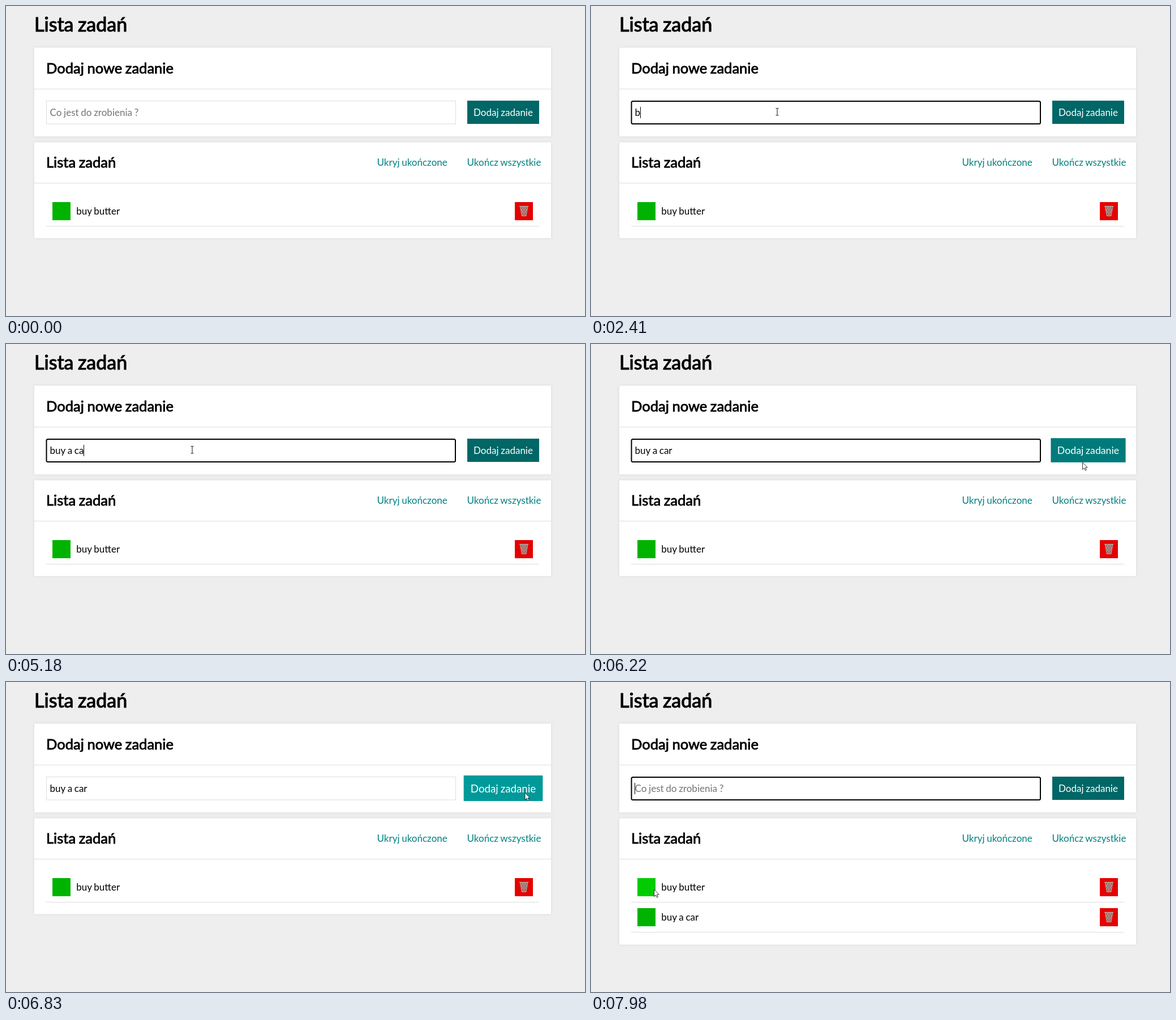
An HTML page for the animation above (8 s loop, 1023x547 px).

```html
<!DOCTYPE html>
<html lang="pl">
<head>
<meta charset="utf-8">
<title>Lista zadań</title>
<style>
html, body { margin: 0; width: 100%; height: 100%; overflow: hidden; background: #eee; }
svg { display: block; }
text { font: 17.03px Lato, sans-serif; word-spacing: -.04em; white-space: pre; }
.h { stroke: #000; stroke-width: .033em; }
.h1 { font-size: 34.06px; }
.h2 { font-size: 25.55px; }
.link { fill: teal; }
.panel { fill: #fff; filter: drop-shadow(0 0 2px #d8d8d8); }
.line { fill: none; stroke: #ddd; }
</style>
</head>
<body>
<svg width="1023" height="547" viewBox="0 0 1023 547">
  <defs>
    <g id="row">
      <path class="line" d="M71 388.5H942"/>
      <rect x="82" y="346" width="32" height="32"/>
      <rect x="899" y="346" width="32" height="32" fill="#e60000"/>
      <g fill="none" stroke="#b0aaa2">
        <path d="M908.5 354L911.3 370.5H919L921.8 354Z" fill="#a5605a"/>
        <path d="M909 357l9 13M912 355l7.5 11M916 355l4.5 6M921.4 357l-9 13M918.4 355l-7.5 11M914.4 355l-4.5 6" stroke-width=".9"/>
        <path d="M907 353.5H923.3" stroke-width="1.4"/>
      </g>
    </g>
  </defs>
  <text class="h h1" x="50" y="45">Lista zadań</text>

  <rect class="panel" x="50" y="73.5" width="913" height="156.5"/>
  <path class="line" d="M50 146.5H963"/>
  <text class="h h2" x="71" y="119">Dodaj nowe zadanie</text>
  <rect id="field" fill="#fff"/>
  <text id="entry" x="77.6" y="194"></text>
  <rect id="caret" y="178" width="1" height="20"/>
  <g id="button">
    <rect x="815" y="167" width="127" height="41"/>
    <text x="878.5" y="194" fill="#fff" text-anchor="middle">Dodaj zadanie</text>
  </g>

  <rect id="list" class="panel" x="50" y="240.5" width="913"/>
  <path class="line" d="M50 312.5H963"/>
  <text class="h h2" x="71" y="285">Lista zadań</text>
  <text class="link" x="655.5" y="282">Ukryj ukończone</text>
  <text class="link" x="814.5" y="282">Ukończ wszystkie</text>
  <use id="first" href="#row"/>
  <text x="124.3" y="368">buy butter</text>
  <g id="added" transform="translate(0 53)">
    <use href="#row" fill="#00b300"/>
    <text x="124.3" y="368">buy a car</text>
  </g>

  <g id="mouse">
    <path id="arrow" d="M.5 .5V13L3.4 10.3L5.3 14.7L7.3 13.8L5.4 9.6H9.2Z" fill="#fff" stroke="#222" stroke-width=".9"/>
    <path id="beam" d="M-2.5 -6.5H-.8L0 -6L.8 -6.5H2.5M0 -6V5.5M-2.5 6H-.8L0 5.5L.8 6H2.5" fill="none" stroke="#111"/>
  </g>
</svg>
<script>
const LOOP = 8000, FOCUS = 640, BLUR = 6650, ADD = 6850, BLINK = 518;
const phrase = 'buy a car';
// Two quick letters, a pause, then a steady rhythm.
const keyTimes = [...phrase].map((_, i) => i < 2 ? 2410 + 230 * i : 3910 + 254 * (i - 2));
const moves = [
  { at: 30, span: 700, x: 329, y: 187, sag: 0 },
  { at: 5890, span: 500, x: 916.5, y: 195, sag: 55 },
  { at: 6855, span: 265, x: 214.5, y: 403.5, sag: 0 },
  { at: 7120, span: 560, x: 111, y: 365.5, sag: 0 }
];

const $ = id => document.getElementById(id);
const set = (id, attrs) => { for (const k in attrs) $(id).setAttribute(k, attrs[k]); };
const show = (id, on) => set(id, { visibility: on ? 'visible' : 'hidden' });
const mix = (a, b, p) => a + (b - a) * p;
const ease = (t, start, span) => 1 - (1 - Math.min(1, Math.max(0, (t - start) / span))) ** 2.3;

function pointer(t) {
  let x = 560, y = 547;
  for (const m of moves) {
    const p = ease(t, m.at, m.span);
    x = mix(x, m.x, p);
    y = mix(y, m.y, p) + m.sag * Math.sin(Math.PI * p);
  }
  return [x, y];
}

function draw(t) {
  const added = t >= ADD;
  const focused = t >= FOCUS && t < BLUR || added;
  const typed = added ? '' : phrase.slice(0, keyTimes.filter(k => k <= t).length);
  const lastKey = Math.max(...[FOCUS, ...keyTimes, ADD].filter(k => k <= t));

  set('field', focused
    ? { x: 71.5, y: 168, width: 722.5, height: 40, rx: 2.5, stroke: '#000', 'stroke-width': 2 }
    : { x: 71.5, y: 167.5, width: 723, height: 40.5, rx: 0, stroke: '#ddd', 'stroke-width': 1 });
  $('entry').textContent = typed || 'Co jest do zrobienia ?';
  set('entry', { fill: typed ? '#000' : '#757575' });
  set('caret', { x: Math.floor(77.6 + (typed && $('entry').getComputedTextLength())) });
  show('caret', focused && Math.floor((t - lastKey) / BLINK) % 2 === 0);

  const hover = ease(t, 6140, 400) - ease(t, 6890, 400);
  const teal = mix(102, 153, hover);
  set('button', {
    fill: `rgb(0,${teal},${teal})`,
    transform: `translate(878.5 188) scale(${1 + hover / 10}) translate(-878.5 -188)`
  });

  set('list', { height: added ? 223 : 169 });
  show('added', added);
  set('first', { fill: `rgb(0,${mix(179, 204, ease(t, 7850, 150))},0)` });

  const [x, y] = pointer(t);
  const inField = x > 71 && x < 795 && y > 167 && y < 208;
  set('mouse', { transform: `translate(${x} ${y})`, display: t < 30 ? 'none' : 'inline' });
  show('beam', inField);
  show('arrow', !inField);
}

const start = performance.now();
(function frame() {
  draw((performance.now() - start) % LOOP);
  requestAnimationFrame(frame);
})();
</script>
</body>
</html>
```
